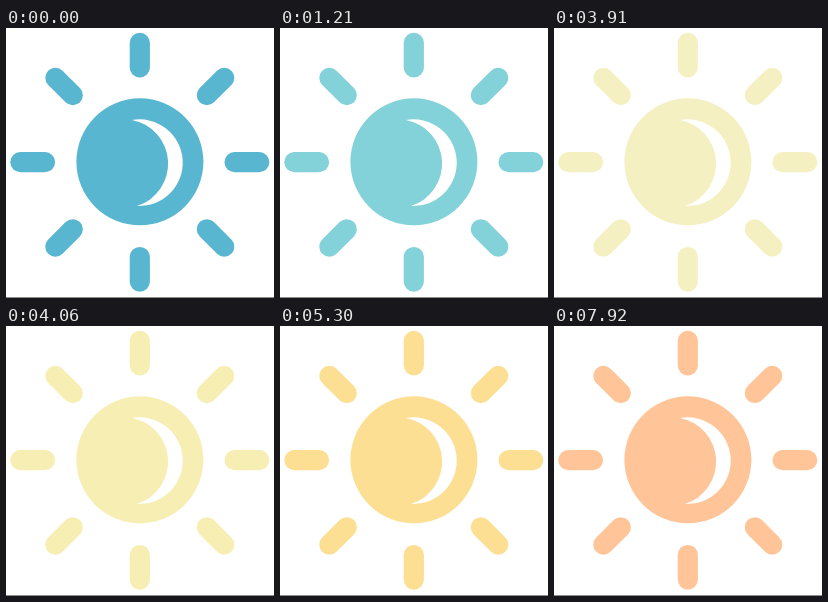
These frames come from a looping animation (268 px wide and 270 px high, 8 s). An HTML page:

```html
<!DOCTYPE html>
<html lang="en">
<head>
<meta charset="utf-8">
<title>Sun and moon</title>
<style>
html, body { margin: 0; width: 100%; height: 100%; overflow: hidden; background: #fff; }
svg { display: block; width: 100%; height: 100%; }
#sun { fill: currentColor; }
#rays { stroke: currentColor; stroke-width: 20.2; stroke-linecap: round; }
</style>
</head>
<body>
<svg viewBox="0 0 268 270">
  <g id="sun">
    <circle cx="133.9" cy="133.8" r="63.5"/>
    <g id="rays" transform="translate(133.8 134.2)"/>
  </g>
  <path fill="#fff" d="M126 92A43.35 43.35 0 1 1 131 178A44.4 44.4 0 0 0 126 92Z"/>
  <path fill="#8c8c8c" d="M0 269h268v1H0z"/>
</svg>
<script>
const LOOP = 8000;
const stops = [
  { at: 0, color: '#59b6d0' },
  { at: 1210, color: '#84d2d9' },
  { at: 2280, color: '#a4e2da' },
  { at: 2820, color: '#eaeec6' },
  { at: 3910, color: '#f5f0c2' },
  { at: 4290, color: '#faea9c' },
  { at: 6760, color: '#ffd085' },
  { at: LOOP, color: '#ffc499' }
];

const sun = document.getElementById('sun');
const rays = document.getElementById('rays');
for (let angle = 0; angle < 360; angle += 45) {
  const ray = document.createElementNS('http://www.w3.org/2000/svg', 'path');
  ray.setAttribute('d', 'M0-94.8V-119.4');
  ray.setAttribute('transform', `rotate(${angle})`);
  rays.append(ray);
}

function colorAt(t) {
  const i = stops.findIndex(s => s.at > t);
  const from = stops[i - 1], to = stops[i];
  const share = 100 * (t - from.at) / (to.at - from.at);
  return `color-mix(in srgb, ${to.color} ${share.toFixed(2)}%, ${from.color})`;
}

function draw() {
  sun.style.color = colorAt(performance.now() % LOOP);
  requestAnimationFrame(draw);
}
draw();
</script>
</body>
</html>
```
